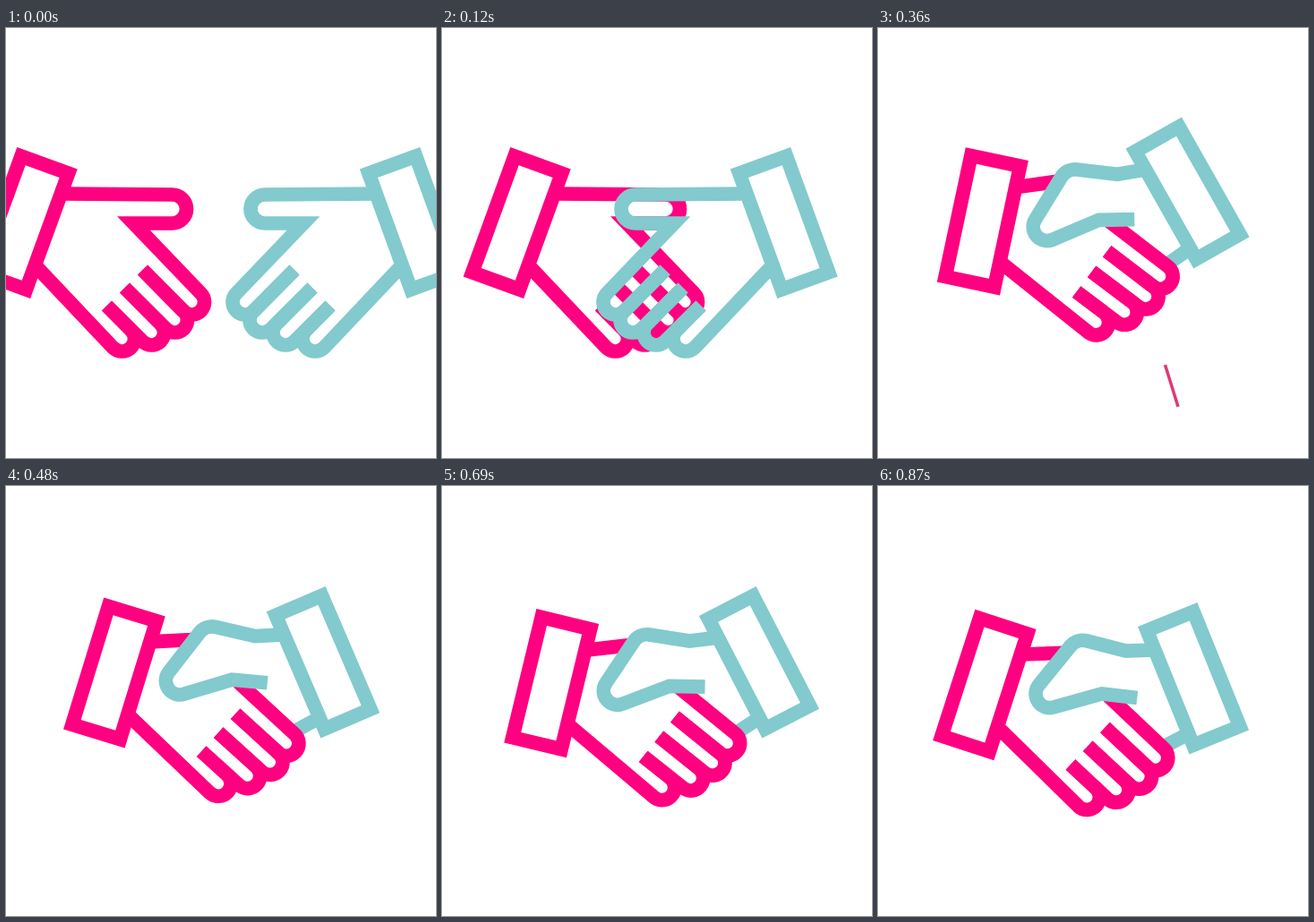
Write an HTML page with a canvas that moves like this. It is 480x480 px and loops after 900 ms.

```html
<!DOCTYPE html>
<html lang="en">
<head>
<meta charset="utf-8">
<title>Handshake</title>
<style>
  html, body { margin: 0; width: 100%; height: 100%; overflow: hidden; background: #fff; }
  canvas { display: block; width: 480px; height: 480px; }
</style>
</head>
<body>
<canvas id="stage" width="480" height="480"></canvas>
<script>
const ctx = document.getElementById('stage').getContext('2d');
const LOOP = 900, STEP = 30, CLASP = 180;
const PINK = '#ff0080', TEAL = '#82cacd', SPARK_PINK = '#dc3a78';
const rad = deg => deg * Math.PI / 180;

// Cuff centres in the drawings below.
const OPEN_CUFF = [20.25, 217.5];
const GRIP_CUFF = [352.2, 214.8];

// Fingertip centres from index to little finger, and the slot ends between them.
const TIPS = [[208, 306], [189, 326], [163, 340], [130, 347]];
const SLOTS = [[153, 270], [133, 290], [113, 310]];
const TIP_RADIUS = 14;
const WRIST = [34, 266];

// time, pink cuff x, y, turn, teal cuff x, y, turn
const POSES = [
  [180, 118.9, 222, -2.1, 352, 214.8, 0],
  [210, 117.4, 218.5, -2.4, 350, 209.8, -1.2],
  [360, 116.9, 215.8, -8, 345.6, 184, -7.5],
  [480, 120.9, 208.5, -2.9, 354, 196.8, -1.2],
  [690, 122.2, 220.2, -6.4, 354, 196.8, -5.3],
  [870, 118.9, 222, -2.1, 352, 214.8, 0]
];

const SPARKS = [
  { color: TEAL, width: 5.5, from: [122, 144], to: [75, 57], start: 150, life: 150 },
  { color: SPARK_PINK, width: 5.5, from: [326, 337], to: [382, 421], start: 150, life: 150 },
  { color: SPARK_PINK, width: 3.5, from: [332, 327], to: [385, 372], start: 150, life: 150 },
  { color: SPARK_PINK, width: 3.5, from: [313, 352], to: [335.4, 424], start: 240, life: 180 }
];

function line(...points) {
  ctx.beginPath();
  points.forEach(p => ctx.lineTo(...p));
  ctx.stroke();
}

function cuff([x, y], angle) {
  ctx.save();
  ctx.translate(x, y);
  ctx.rotate(rad(angle));
  ctx.strokeRect(-28, -69, 56, 138);
  ctx.restore();
}

// Continues the current path, which leads into the index finger.
function fingers() {
  TIPS.forEach(([x, y], i) => {
    if (i) {
      ctx.beginPath();
      ctx.moveTo(...SLOTS[i - 1]);
    }
    ctx.arc(x, y, TIP_RADIUS, rad(-45), rad(135));
    ctx.lineTo(...(SLOTS[i] || WRIST));
    ctx.stroke();
  });
}

function openHand(color) {
  ctx.strokeStyle = color;
  cuff(OPEN_CUFF, 20);
  ctx.beginPath();
  ctx.moveTo(62, 185);
  ctx.lineTo(186, 186);
  ctx.arc(186, 202, 16, rad(-90), rad(90));
  ctx.lineTo(143, 218);
  fingers();
}

function grippedHand() {
  ctx.strokeStyle = PINK;
  cuff(OPEN_CUFF, 20);
  line([62, 185], [110, 185]);
  ctx.beginPath();
  ctx.moveTo(158, 235);
  fingers();
}

function grippingThumb() {
  ctx.strokeStyle = TEAL;
  cuff(GRIP_CUFF, -22);
  ctx.beginPath();
  ctx.moveTo(309, 183);
  ctx.lineTo(277, 184);
  ctx.arcTo(222, 170, 149, 260, 18);
  ctx.arcTo(149, 260, 250, 232, 15.6);
  ctx.lineTo(250, 232);
  ctx.lineTo(289.5, 236.5);
  ctx.stroke();
}

function placed([px, py], x, y, turn, draw) {
  ctx.save();
  ctx.translate(x, y);
  ctx.rotate(rad(turn));
  ctx.translate(-px, -py);
  draw();
  ctx.restore();
}

// Smooth curve through the poses, at rest at both ends of each track.
function poseAt(t) {
  const last = POSES.length - 1;
  let i = 0;
  while (i < last - 1 && t >= POSES[i + 1][0]) i++;
  const a = POSES[i], b = POSES[i + 1], span = b[0] - a[0];
  const u = (t - a[0]) / span;
  const slope = (k, c) => {
    if (k === 0 || k === last) return 0;
    const p = POSES[k - 1], n = POSES[k + 1];
    return (n[c] - p[c]) / (n[0] - p[0]);
  };
  return [1, 2, 3, 4, 5, 6].map(c => {
    const d = b[c] - a[c], s0 = slope(i, c) * span, s1 = slope(i + 1, c) * span;
    return a[c] + u * (s0 + u * (3 * d - 2 * s0 - s1 + u * (s0 + s1 - 2 * d)));
  });
}

function approach(t) {
  const frames = t / STEP;
  ctx.save();
  ctx.translate(16 * frames - 0.5, 0);
  openHand(PINK);
  ctx.restore();
  ctx.save();
  ctx.translate(475 - 18.25 * frames, 0);
  ctx.scale(-1, 1);
  openHand(TEAL);
  ctx.restore();
}

function shake(t) {
  const [px, py, pTurn, tx, ty, tTurn] = poseAt(t);
  placed(GRIP_CUFF, tx, ty, tTurn, () => {
    ctx.strokeStyle = TEAL;
    line([346, 277], [321, 290]);
  });
  placed(OPEN_CUFF, px, py, pTurn, grippedHand);
  placed(GRIP_CUFF, tx, ty, tTurn, grippingThumb);
}

function spark({ color, width, from, to, start, life }, t) {
  const u = (t - start) / life;
  if (u <= 0 || u >= 1 || t < CLASP) return;
  const head = 1 - (1 - u) ** 3.7;
  const tail = u * u * 0.75;
  const at = k => [0, 1].map(c => from[c] + (to[c] - from[c]) * k);
  ctx.strokeStyle = color;
  ctx.lineWidth = width;
  line(at(tail), at(head));
}

function frame(now) {
  const t = Math.floor((now % LOOP) / STEP) * STEP;
  ctx.fillStyle = '#fff';
  ctx.fillRect(0, 0, 480, 480);
  ctx.lineWidth = 15.7;
  if (t < CLASP) approach(t);
  else shake(t);
  SPARKS.forEach(s => spark(s, t));
}

const began = performance.now();
function tick() {
  frame(performance.now() - began);
  requestAnimationFrame(tick);
}
tick();
</script>
</body>
</html>
```
